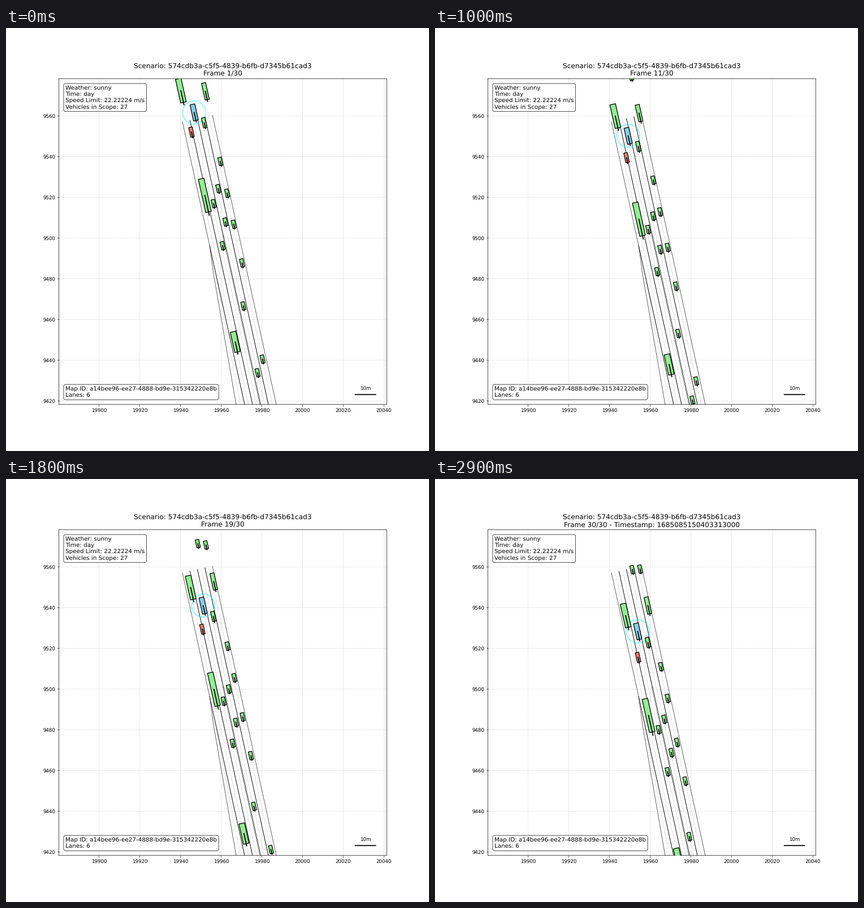
These frames come from a looping animation (748x748 px, 3 s). A matplotlib script:

```python
import numpy as np
import matplotlib.pyplot as plt
from matplotlib.animation import FuncAnimation
from matplotlib.patches import Circle, Polygon

STAGE = 748
FRAMES = 30
SCALE = 3.6                      # pixels per metre
LEFT, BOTTOM = 93.5, 665.72      # axes corner in pixels
X0, Y0 = 19880.28, 9418.26       # map position of that corner

# Unsnapped lines and unhinted glyphs keep true sizes at this low dpi.
plt.rcParams.update({"font.family": "DejaVu Sans", "text.hinting": "none",
                     "path.snap": False})

fig, ax = plt.subplots(figsize=(12, 12), dpi=STAGE / 12)
ax.set_xlim(X0, X0 + 0.775 * STAGE / SCALE)
ax.set_ylim(Y0, Y0 + 0.77 * STAGE / SCALE)
ax.set_xticks(range(19900, 20041, 20))
ax.set_yticks(range(9420, 9561, 20))
ax.ticklabel_format(useOffset=False, style="plain")
ax.grid(True, linestyle="--", alpha=0.5)
title = ax.set_title("", fontsize=14)


def world(x, y):
    """Stage pixels to map metres."""
    return X0 + (x - LEFT) / SCALE, Y0 + (BOTTOM - y) / SCALE


def path(*points, **style):
    xs, ys = zip(*(world(*p) for p in points))
    ax.plot(xs, ys, **style)


# Road: border k runs straight from its top to its foot.
FOOT_Y = 666
BORDER = dict(color="black", lw=1, alpha=0.7)
MIDDLE = dict(color="gray", lw=0.8, ls="--", alpha=0.5)


def top(k):
    return 312 + 13.25 * k, 166 - 3 * k


def foot(k, shift=0):
    return 422 + 14 * k + shift, FOOT_Y


def along(k, y, shift=0):
    (xa, ya), (xb, yb) = top(k), foot(k)
    return xa + (xb - xa) * (y - ya) / (yb - ya) + shift, y


def border(*points, times=1):
    for _ in range(times):
        path(*points, **BORDER)


fork = along(0, 385)
border(top(0), fork)
border(fork, foot(0), times=2)
border(fork, (367, 435), (407, FOOT_Y))
path(fork, (368.5, 425), (414.5, FOOT_Y), **MIDDLE)
for k in (1, 3):
    border(top(k), foot(k), times=2)
border(top(2), along(2, 368), times=2)
for shift in (-0.7, 0.7):
    border(along(2, 368, shift), foot(2, shift))
border(top(4), foot(4))
for k in range(4):
    path(top(k + 0.5), foot(k + 0.5), **MIDDLE)

# Info boxes and scale bar
box = dict(boxstyle="round", facecolor="white", alpha=0.8)
label = dict(transform=ax.transAxes, fontsize=12, bbox=box, zorder=10)
ax.text(0.02, 0.98, "Weather: sunny\nTime: day\nSpeed Limit: 22.22224 m/s\n"
        "Vehicles in Scope: 27", va="top", **label)
ax.text(0.02, 0.02, "Map ID: a14bee96-ee27-4888-bd9e-315342220e8b\nLanes: 6",
        va="bottom", **label)
path((617.6, 648.2), (653.6, 648.2), color="black", lw=2)
ax.text(*world(635.6, 639.5), "10m", ha="center", fontsize=10)

# Traffic: every lane has a straight track, every vehicle a constant speed.
SLOPE = 0.2135
HEADING = np.array([0.2217, -1]) / np.hypot(0.2217, 1)
SIDE = np.array([-HEADING[1], HEADING[0]])


class Vehicle:
    def __init__(self, lane, start, speed, length=4, width=1.75,
                 color="lightgreen", drift=0):
        self.lane, self.start, self.speed = lane, start, speed
        self.drift = drift       # lanes crossed during one loop
        self.length = length
        self.fore = HEADING * length / 2
        self.side = SIDE * width / 2
        self.body = ax.add_patch(Polygon(np.zeros((4, 2)), facecolor=color,
                                         edgecolor="black", lw=1.5, zorder=5))
        self.nose, = ax.plot([], [], color="black", lw=2, zorder=6)

    def move(self, i):
        y = self.start + self.speed * i
        lane = self.lane + self.drift * i / FRAMES
        mid = np.array(world(319 + 13.9 * lane + SLOPE * (y - 150), y))
        self.body.set_xy([mid + a * self.fore + b * self.side
                          for a, b in ((1, 1), (1, -1), (-1, -1), (-1, 1))])
        self.nose.set_data(*zip(mid, mid + 1.2 * self.fore))
        return mid


TRUCK = 2.8
ego = Vehicle(1, 149.3, 4.14, 8.1, 2.4, "skyblue")
vehicles = [
    ego,
    Vehicle(0.13, 184, 4.53, 4.85, color="salmon", drift=0.22),
    Vehicle(-0.1, 110.7, 4.51, 11.9, TRUCK),
    Vehicle(0.1, 296, 4.21, 16.7, TRUCK),
    Vehicle(0, 555, 4.0, 10.2, TRUCK),
    Vehicle(3, 112, 3.85, 8.4, 2.05),
    Vehicle(2, 167.5, 4.19, 4.95),
]

# Cars of a platoon share lane and speed.
PLATOONS = [
    (1, 4.57, (310.5, 385)),
    (2, 4.18, (39,)),
    (2, 4.85, (284, 343, 491.5, 609.5)),
    (3, 3.3, (236, 292)),
    (3, 4.09, (347, 415.5)),
    (3, 3.87, (47, 585.5)),
]
vehicles += [Vehicle(lane, start, speed)
             for lane, speed, starts in PLATOONS for start in starts]

ring = ax.add_patch(Circle((0, 0), 0.7 * ego.length, fill=False,
                           edgecolor="cyan", lw=2, alpha=0.5, zorder=4))


def update(i):
    text = f"Scenario: 574cdb3a-c5f5-4839-b6fb-d7345b61cad3\nFrame {i + 1}/{FRAMES}"
    if i == FRAMES - 1:
        text += " - Timestamp: 1685085150403313000"
    title.set_text(text)
    for vehicle in vehicles:
        vehicle.move(i)
    ring.center = ego.move(i)
    return []


anim = FuncAnimation(fig, update, frames=FRAMES, interval=100, repeat=True,
                     repeat_delay=0, init_func=lambda: update(0))
plt.show()
```
